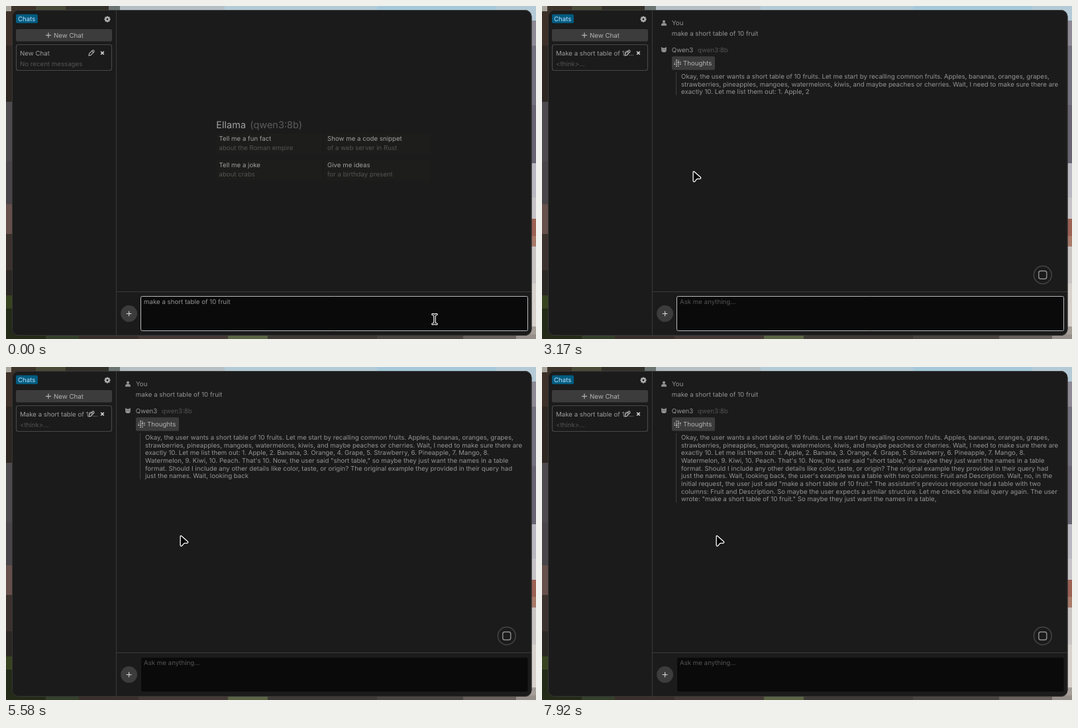
Write an HTML page with a canvas that moves like this. It is 800 px wide and 504 px high and loops after 8000 ms.

```html
<!DOCTYPE html>
<html lang="en">
<head>
<meta charset="utf-8">
<title>Chat window</title>
<style>
  html, body { margin: 0; width: 100%; height: 100%; overflow: hidden; background: #1b1b1b; }
  canvas { display: block; width: 800px; height: 504px; }
</style>
</head>
<body>
<canvas id="stage" width="800" height="504"></canvas>
<script>
const ctx = document.getElementById('stage').getContext('2d');
const LOOP = 8000, FPS = 12;
const SENT = 920, REPLY = 1250, COLLAPSE = 3830, EXPAND = 4160;
const TEXT = '#949494', BRIGHT = '#b4b4b4', WEAK = '#545454', LINE = '#3c3c3c';
const PROMPT = 'make a short table of 10 fruit';

// Each part of the reply is complete at the given time.
const reply = [
  [2000, 'Okay, the user wants a short table of 10 fruits. Let me start by recalling common fruits. Apples, bananas, oranges, grapes'],
  [3170, ',\nstrawberries, pineapples, mangoes, watermelons, kiwis, and maybe peaches or cherries. Wait, I need to make sure there are' +
    '\nexactly 10. Let me list them out: 1. Apple, 2'],
  [5580, '. Banana, 3. Orange, 4. Grape, 5. Strawberry, 6. Pineapple, 7. Mango, 8.' +
    '\nWatermelon, 9. Kiwi, 10. Peach. That\'s 10. Now, the user said "short table," so maybe they just want the names in a table' +
    '\nformat. Should I include any other details like color, taste, or origin? The original example they provided in their query had' +
    '\njust the names. Wait, looking back'],
  [6580, ', the user\'s example was a table with two columns: Fruit and Description. Wait, no, in the' +
    '\ninitial request, the user just said "make a short table of 10 fruit." The assistant\'s'],
  [7920, ' previous response had a table with two' +
    '\ncolumns: Fruit and Description. So maybe the user expects a similar structure. Let me check the initial query again. The user' +
    '\nwrote: "make a short table of 10 fruit." So maybe they just want the names in a table,']
].map(([end, text]) => ({ end, tokens: text.match(/[ \n]?[A-Za-z]+|[^]/g) }));

// Pointer path: time, x, y
const path = [
  [0, 647, 474], [580, 422, 455], [2080, 422, 455], [2830, 228, 251], [3200, 228, 251],
  [3700, 241, 89], [4250, 241, 89], [4700, 263, 256], [LOOP, 263, 256]
];

function streamed(t) {
  let out = '', start = REPLY - 80;
  for (const { end, tokens } of reply) {
    const share = Math.min(1, (t - start) / (end - start));
    if (share <= 0) break;
    out += tokens.slice(0, Math.round(tokens.length * share)).join('');
    start = end;
  }
  return out;
}

function pointerAt(t) {
  const i = path.findIndex((p, k) => k && t <= p[0]);
  const [t0, x0, y0] = path[i - 1], [t1, x1, y1] = path[i];
  const u = (t - t0) / (t1 - t0), ease = u * u * (3 - 2 * u);
  return [x0 + (x1 - x0) * ease, y0 + (y1 - y0) * ease];
}

function text(str, x, y, color = TEXT, size = 9.7) {
  ctx.font = `${size}px Inter, sans-serif`;
  ctx.fillStyle = color;
  ctx.fillText(str, x, y);
}

function box(x, y, w, h, r, fill, stroke, width = 1) {
  ctx.beginPath();
  ctx.roundRect(x, y, w, h, r);
  paint(fill, stroke, width);
}

function disc(x, y, r, fill, stroke, width) {
  ctx.beginPath();
  ctx.arc(x, y, r, 0, 2 * Math.PI);
  paint(fill, stroke, width);
}

function shape(d, fill, stroke, width, x = 0, y = 0) {
  ctx.save();
  ctx.translate(x, y);
  const p = new Path2D(d);
  ctx.lineWidth = width || 1;
  if (stroke) { ctx.strokeStyle = stroke; ctx.stroke(p); }
  if (fill) { ctx.fillStyle = fill; ctx.fill(p); }
  ctx.restore();
}

function paint(fill, stroke, width = 1) {
  if (fill) { ctx.fillStyle = fill; ctx.fill(); }
  if (stroke) { ctx.strokeStyle = stroke; ctx.lineWidth = width; ctx.stroke(); }
}

// Paints flat bands along one side; each band runs from its start to the next one.
function strip(x, y, w, h, bands) {
  const vertical = h > w;
  for (const [start, color] of bands) {
    ctx.fillStyle = color;
    if (vertical) ctx.fillRect(x, start, w, h - start);
    else ctx.fillRect(start, y, w - start, h);
  }
}

function drawWallpaper() {
  strip(784, 0, 16, 504, [[0, '#b4cad6'], [22, '#8d8a96'], [60, '#757280'], [150, '#696573'],
    [238, '#b9b7c0'], [290, '#c6c2c6'], [322, '#9c6253'], [348, '#a97a69'], [364, '#c9c4c3'],
    [420, '#d6d1cc'], [485, '#a69e98']]);
  strip(0, 0, 16, 504, [[0, '#b5aea6'], [6, '#3d3028'], [60, '#2e2721'], [145, '#4d4b4e'],
    [235, '#494447'], [300, '#67504b'], [345, '#3b312d'], [400, '#2b2723'], [438, '#37441f'],
    [458, '#232a18']]);
  strip(0, 0, 800, 8, [[0, '#a9a49c'], [8, '#3c332a'], [45, '#4a4a38'], [90, '#33322a'],
    [155, '#6b7370'], [172, '#b4bfc4'], [330, '#b3cbd6'], [560, '#a5c8da'], [740, '#b4cad6']]);
  strip(0, 497, 800, 7, [[0, '#242b18'], [60, '#35402a'], [110, '#3a302b'], [200, '#463a36'],
    [335, '#5b6645'], [395, '#3f3a36'], [560, '#4a4541'], [690, '#68615c'], [770, '#968f89']]);
}

function drawPencil(x, y) {
  shape('M-4 4L-3.4 1L1.5-3.8Q2.6-4.6 3.7-3.5Q4.6-2.4 3.8-1.4L-1.1 3.4ZM.5-2.8L2.8-.5', null, BRIGHT, 1.1, x, y);
}

function drawPlus(x, y, r, color) {
  shape(`M${-r} 0H${r}M0 ${-r}V${r}`, null, color, 1.2, x, y);
}

function drawSidebar(sent, replying) {
  box(15, 12.5, 33, 13.5, 2, '#005c80');
  text('Chats', 18, 23, '#c0deff');
  for (let i = 0; i < 8; i++) {
    const a = i * Math.PI / 4;
    disc(153 + 3.7 * Math.cos(a), 20 + 3.7 * Math.sin(a), 1.05, BRIGHT);
  }
  disc(153, 20, 2.6, null, BRIGHT, 2.2);
  box(15, 35, 145, 18.5, 2, LINE);
  drawPlus(64, 44.3, 4, BRIGHT);
  text('New Chat', 72, 47.8, BRIGHT);
  box(15.5, 58.5, 144, 39, 3, null, '#484848', 1.2);
  text(sent ? 'Make a short table of 10...' : 'New Chat', 21, 74.6, '#9c9c9c');
  text(replying ? '<think>...' : 'No recent messages', 21, 90.5, WEAK);
  drawPencil(129, 71);
  shape('M-2.3-2.3L2.3 2.3M2.3-2.3L-2.3 2.3', null, '#d0d0d0', 1.7, 145.5, 71.2);
}

function drawWelcome() {
  text('Ellama', 317.3, 184.8, '#a0a0a0', 14.5);
  text('(qwen3:8b)', 368.3, 184.8, '#5c5c5c', 14.5);
  [
    [317.5, 193, 'Tell me a fun fact', 'about the Roman empire'],
    [481, 193, 'Show me a code snippet', 'of a web server in Rust'],
    [317.5, 233, 'Tell me a joke', 'about crabs'],
    [481, 233, 'Give me ideas', 'for a birthday present']
  ].forEach(([x, y, title, detail]) => {
    box(x, y, 160, 31, 2, '#1d1d1c');
    text(title, x + 4, y + 11, '#a0a0a0');
    text(detail, x + 4, y + 25.4, WEAK);
  });
}

function drawSpinner(x, y, t, color) {
  ctx.fillStyle = color;
  for (let i = 0; i < 16; i++) {
    const col = i % 4 - 1.5, row = (i >> 2) - 1.5, far = Math.hypot(col, row);
    if (far > 2) continue;
    const s = (far < 1 ? 1.9 : 1.4) + .35 * Math.sin(t / 130 + col * 1.7 - row * 2.3);
    ctx.fillRect(x + col * 2.9 - s / 2, y + row * 2.9 - s / 2, s, s);
  }
}

function drawThoughts(t, hovered) {
  const collapsed = t >= COLLAPSE && t < EXPAND;
  if (hovered) box(195.5, 75.5, 66, 22, 3, '#464646', '#969696');
  else box(196, 76.2, 65, 20.6, 2, LINE);
  drawSpinner(204.5, 86.5, t, collapsed ? '#888' : '#bcbcbc');
  text('Thoughts', 213, 90, hovered ? '#f0f0f0' : BRIGHT);
  if (collapsed) return;
  const lines = streamed(t).split('\n'), pitch = 11.67;
  lines.forEach((line, i) => text(line, 210, 110 + i * pitch));
  ctx.fillStyle = LINE;
  ctx.fillRect(202, 100, 1, lines.length * pitch);
}

function drawChat(t, hovered) {
  disc(184, 23.7, 2.1, TEXT);
  shape('M-4 4V2.5Q-4 0 0 0Q4 0 4 2.5V4Z', TEXT, null, 1, 184, 25.8);
  text('You', 196, 29.3);
  text(PROMPT, 195.8, 45);
  shape('M-3.8-4.3L-1.6-2.5H1.6L3.8-4.3V1.2Q3.6 4 0 4Q-3.6 4-3.8 1.2Z', TEXT, null, 1, 184, 66);
  disc(182.5, 66, .6, '#1b1b1b');
  disc(185.5, 66, .6, '#1b1b1b');
  text('Qwen3', 195.8, 69.7);
  text('qwen3:8b', 235, 69.7, WEAK);
  if (t >= REPLY) drawThoughts(t, hovered);
  disc(755.8, 407, 13.4, null, '#454545', 1.5);
  box(749.8, 401, 12, 12, 3, null, '#909090', 1.4);
}

function drawInput(sent, focused) {
  disc(185.6, 465.6, 12.5, LINE);
  drawPlus(185.6, 465.6, 3.8, '#c8c8c8');
  box(204, 440, 583.5, 51.3, 2, '#0a0a0a');
  if (focused) box(203.5, 439.5, 584, 52, 2, null, '#b8bcc0');
  text(sent ? 'Ask me anything...' : PROMPT, 208, 451.4, sent ? WEAK : TEXT);
}

function drawPointer(x, y) {
  ctx.lineJoin = ctx.lineCap = 'round';
  if (y > 439) {
    const beam = 'M-3-7.2Q0-7.2 0-5Q0-7.2 3-7.2M0-5V5M-3 7.2Q0 7.2 0 5Q0 7.2 3 7.2';
    shape(beam, null, '#fff', 3.6, x, y);
    shape(beam, null, '#000', 1.3, x, y);
  } else {
    shape('M.8.6Q.8-.4 1.7.4L10.7 8.4Q11.7 9.7 10.2 10H6.4Q5.6 10.1 5 10.8L2.4 14Q1.1 15.1.8 13.6Z',
      '#000', '#fff', 2.6, x, y);
  }
  ctx.lineJoin = 'miter';
  ctx.lineCap = 'butt';
}

function draw(t) {
  const sent = t >= SENT, [x, y] = pointerAt(t);
  const hovered = x > 196 && x < 261 && y > 76 && y < 97;
  ctx.textRendering = 'geometricPrecision';
  drawWallpaper();
  box(9, 6, 784.5, 493, 10, '#1b1b1b');
  box(9.5, 6.5, 783.5, 492, 9.5, null, '#363636');
  ctx.fillStyle = LINE;
  ctx.fillRect(166, 7, 1, 492);
  ctx.fillRect(167, 432, 626, 1);
  drawSidebar(sent, t >= REPLY);
  if (sent) drawChat(t, hovered);
  else drawWelcome();
  drawInput(sent, t < COLLAPSE);
  drawPointer(x, y);
}

function frame(now) {
  const step = Math.floor((now % LOOP) * FPS / 1000 + .1);
  draw((step * 1000 / FPS) % LOOP);
  requestAnimationFrame(frame);
}
requestAnimationFrame(frame);
</script>
</body>
</html>
```
